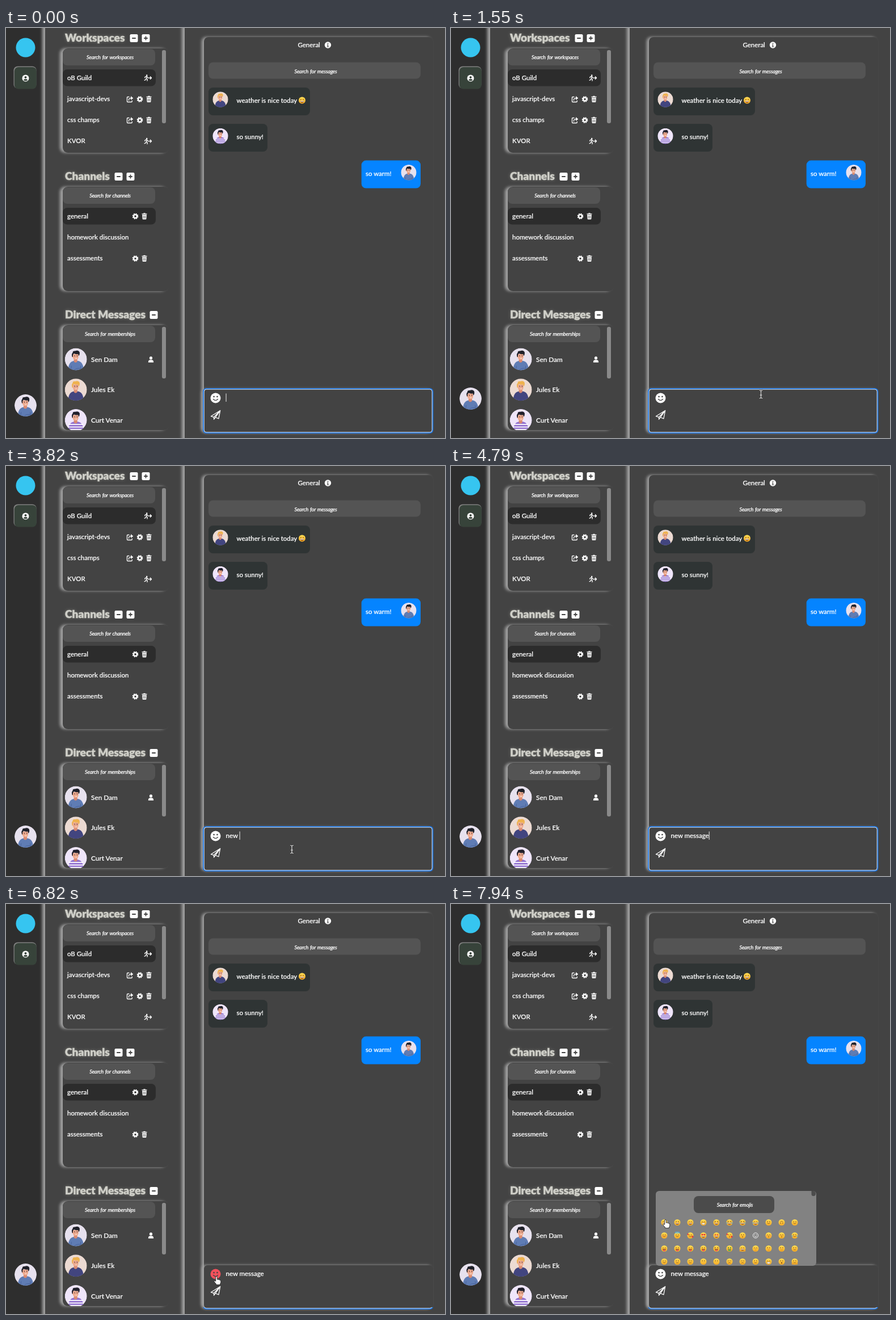
Animation of 774 by 723 pixels, one loop 8000 ms. Source, as an HTML page:

```html
<!DOCTYPE html>
<html lang="en">
<head>
<meta charset="utf-8">
<title>Team chat</title>
<style>
html, body { margin: 0; width: 100%; height: 100%; overflow: hidden; background: #434343; }
svg { display: block; }
text { font: 500 11.45px Lato, "Open Sans", sans-serif; fill: #fff; stroke: #fff; stroke-width: .22px; white-space: pre; }
.head { font-size: 19.1px; font-weight: 900; fill: #cfcfc8; stroke: #cfcfc8; stroke-width: .5px; }
.hint { font-size: 9.3px; font-style: italic; letter-spacing: -.25px; word-spacing: 1px; text-anchor: middle; }
.name { font-size: 11.8px; }
.line { fill: none; stroke: #fff; stroke-width: 1.3; stroke-linecap: round; stroke-linejoin: round; }
</style>
</head>
<body>
<svg id="stage" width="774" height="723" viewBox="0 0 774 723"></svg>
<script>
const BG = '#434343';
const stage = document.getElementById('stage');

const rect = (x, y, w, h, r, fill, more = '') =>
  `<rect x="${x}" y="${y}" width="${w}" height="${h}" rx="${r}" fill="${fill}" ${more}/>`;
const disc = (x, y, r, fill, more = '') => `<circle cx="${x}" cy="${y}" r="${r}" fill="${fill}" ${more}/>`;
const path = (d, fill, more = '') => `<path d="${d}" fill="${fill}" ${more}/>`;
const line = (d, more = '') => `<path class="line" d="${d}" ${more}/>`;
const text = (x, y, s, cls = '') => `<text x="${x}" y="${y}" class="${cls}">${s}</text>`;
const at = (x, y, body, k = 1) => `<g transform="translate(${x} ${y}) scale(${k})">${body}</g>`;

// Box with a soft light falling past its left edge
const panel = (x, y, w, h, r, dx = 5) =>
  rect(x - dx, y, w, h, r, '#a2a2a2', 'filter="url(#soft)"') + rect(x, y, w, h, r, BG);

const tile = rect(-7, -7, 14, 14, 2.2, '#fff') + rect(-3.4, -.9, 6.8, 1.8, .6, BG);
const icons = {
  minus: tile,
  plus: tile + rect(-.9, -3.4, 1.8, 6.8, .6, BG),
  gear: disc(0, 0, 2.9, 'none', 'stroke="#fff" stroke-width="2.4"') +
    disc(0, 0, 4.5, 'none', 'stroke="#fff" stroke-width="1.7" stroke-dasharray="2.1 1.434"'),
  trash: rect(-4.6, -4.8, 9.2, 1.4, .5, '#fff') + rect(-1.8, -5.7, 3.6, 1.5, .5, '#fff') +
    path('M-3.9-2.8H3.9L3.4 4.6Q3.3 5.5 2.4 5.5H-2.4Q-3.3 5.5-3.4 4.6Z', '#fff') +
    path('M-1.8-1V3.8M0-1V3.8M1.8-1V3.8', 'none', `stroke="${BG}" stroke-width=".7"`),
  share: line('M-1.5-4H-3.8Q-5-4-5-2.8V3.8Q-5 5-3.8 5H2.6Q3.8 5 3.8 3.8V2.6') +
    line('M-2 2Q-2.4-1.9 2-1.9', 'stroke-width="1.8"') + path('M1.6-5.4L5.8-1.8L1.6 1.6Z', '#fff'),
  leave: disc(-1.8, -4.4, 1.3, '#fff') +
    line('M-5.4-.2L-4.4-2.2L-1.6-2.5L.2-.1L1.8.1M-1.8-2L-2.7.9L-.7 2.6L-1 5M-3 1.4L-3.7 3.2L-5.8 4.2') +
    line('M2.6 0H6.2M4.4-2.2L6.5 0L4.4 2.2'),
  user: disc(0, -2.6, 2.6, '#fff') + path('M-4.7 5.2Q-4.7.8-1 .8H1Q4.7.8 4.7 5.2Z', '#fff'),
  account: disc(0, 0, 6, '#fff') + disc(0, -1.5, 2, '#37433a') + path('M-3.6 3.6Q-3 1.4-1 1.4H1Q3 1.4 3.6 3.6Q0 6 -3.6 3.6Z', '#37433a'),
  info: disc(0, 0, 5.7, '#fff') + disc(0, -2.6, .95, BG) + path('M-1.3-.8H.6V2.4H1.5V3.5H-1.5V2.4H-.6V.3H-1.3Z', BG),
  plane: line('M-8.2 2.2L8.2-8L5.4 6.4L-.4 4L-3 7.6V3.8ZM-3 3.8L8.2-8L-.4 4', 'stroke-width="1.5"'),
};
const icon = (id, x, y) => at(x, y, icons[id]);

// Illustrated portraits, drawn in a circle of radius 20
const looks = {
  blue: ['#e7e1ee', '#5f7cb4', '#1f2029'],
  blond: ['#ecdad2', '#42457f', '#efb24f'],
  stripe: ['#efe5fb', '#9170d0', '#22202c'],
};
function avatar(kind, x, y, r) {
  const [back, shirt, hair] = looks[kind];
  let body = path('M-14 21Q-14 5-4 3H4Q14 5 14 21Z', shirt);
  if (kind === 'stripe') body += path('M-13 8H13M-14 12.5H14M-14 17H14', 'none', 'stroke="#fff" stroke-width="1.8"');
  if (kind === 'blue') body += path('M-9 20L-8 12M9 20L8.5 12M-3 20Q2 15 9 17', 'none', 'stroke="#48639b" stroke-width="1"');
  const head = path('M-3.6 0H3.6V7Q0 11-3.6 7Z', '#d9896f') +
    path('M-6-9H6V-3Q5.5 3.4 0 3.4T-6-3Z', '#eeaa8e') + disc(-6.2, -3.6, 1.6, '#eeaa8e') +
    path('M-7-3Q-9.5-9-6-12Q-6.5-16-1-15.5Q6-18 8.5-12.5Q9-7 6.4-5L5.4-9Q0-8-3.5-10L-5.6-7.5V-3Z', hair) +
    path('M-3-6H-1M2-6H4.4', 'none', 'stroke="#3a2730" stroke-width=".8"') +
    disc(-1.8, -4.2, .7, '#3a2730') + disc(3.2, -4.2, .7, '#3a2730') +
    path('M-1.4-.4Q1 1.6 3.2-.5Z', '#fff');
  return at(x, y, '<g clip-path="url(#round)">' + disc(0, 0, 20, back) + body + at(-.5, -1.6, head, .86) + '</g>', r / 20);
}

// Small faces: eyes, mouth, extra
const DARK = '#80501a';
const INK = `stroke="${DARK}" stroke-width=".8" stroke-linecap="round"`;
const pair = f => f(-2.1) + f(2.1);
const eyes = {
  o: pair(x => `<ellipse cx="${x}" cy="-1.4" rx=".7" ry="1.05" fill="${DARK}"/>`),
  '^': pair(x => path(`M${x - 1.2}-.8Q${x}-2.8 ${x + 1.2}-.8`, 'none', INK)),
  x: path('M-3.4-2.4L-1.4-1.4L-3.4-.4M3.4-2.4L1.4-1.4L3.4-.4', 'none', INK),
  h: pair(x => path(`M${x} .4L${x - 2}-2Q${x - 1}-3.8 ${x}-2.4Q${x + 1}-3.8 ${x + 2}-2Z`, '#e8283c')),
  s: pair(x => path(`M${x}-3.6L${x + .7}-2L${x + 2}-1.7L${x + .7}-.7L${x + 1} .6L${x}-.2L${x - 1} .6L${x - .7}-.7L${x - 2}-1.7L${x - .7}-2Z`, '#e4483c')),
  w: disc(-2.1, -1.4, .8, DARK) + path('M1-1.2Q2.2-2.4 3.4-1.2', 'none', INK),
  '-': path('M-3.3-1.3H-1M1-1.3H3.3', 'none', INK),
  g: pair(x => disc(x, -1.3, 1.2, '#3c8f3a')),
};
const grin = 'M-3.3 1H3.3Q2.8 4.2 0 4.2T-3.3 1Z';
const mouths = {
  D: path(grin, '#93521f') + path('M-3.1 1.1H3.1L2.7 2.2H-2.7Z', '#fff'),
  G: path(grin, '#fff', `stroke="${DARK}" stroke-width=".4"`),
  u: path('M-2.4 1.5Q0 3.8 2.4 1.5', 'none', INK),
  f: path('M-2.2 2.8Q0 1 2.2 2.8', 'none', INK),
  k: path('M-.4 1.2Q1.6 1.6 0 2.4Q1.6 2.8-.4 3.6', 'none', INK),
  _: path('M-2 2.4H2', 'none', INK),
  T: path(grin, '#93521f') + path('M-1.5 2.4H1.7V4.4Q0 6-1.5 4.4Z', '#f0506e'),
  O: `<ellipse cy="2.5" rx="1.2" ry="1.5" fill="${DARK}"/>`,
  n: '',
};
const extras = {
  '.': '',
  b: disc(-4.8, 1, 1.1, '#4aa8ee') + disc(4.6, 1, 1.1, '#4aa8ee'),
  a: `<ellipse cy="-5.6" rx="4" ry="1.3" fill="none" stroke="#49b4f0" stroke-width="1.1"/>`,
  r: pair(x => disc(x * 1.7, 1.3, 1.1, '#f58a5e')),
  R: disc(4.2, 2.4, 1.6, '#e8283c') + disc(-4.6, -2.2, 1.3, '#e8283c'),
  g: path('M-2.4 1.6H2.4V5H-2.4Z', '#62a955'),
  y: pair(x => disc(x * 1.9, 4, 1.9, '#eda52e')),
  Y: disc(0, 3.4, 2.2, '#eda52e'),
  v: '',
};
function face(x, y, code, r = 5.5) {
  const [e, m, plus] = code;
  if (e === 'B') return at(x, y, disc(0, 0, 4.6, 'none', 'stroke="#fff" stroke-width=".9"') +
    pair(p => disc(p * .8, -1.3, .7, '#fff')) + path('M-2.4 1Q0 4 2.4 1', 'none', 'stroke="#fff" stroke-width=".9"'));
  const flip = plus === 'v' ? 'transform="scale(1 -1)"' : '';
  return at(x, y, disc(0, 0, 6, 'url(#sun)') + `<g ${flip}>${eyes[e]}${mouths[m]}</g>` + extras[plus], r / 6);
}
const faces = [
  'oD. oD. ^D. ^G. xD. xDb xDb ^Db ou. ouv wu.',
  '^ur ^ua ^uR hD. sD. wkR ok. B.. ^kr ^k. oub',
  '^T. oT. wT. oT. xT. gTg ^Dy ^nY onY o_Y o_.',
  'wu. o_. -_. on. on. -f. -f. o_. ^G. oO. o_y',
];

function section(y, title, hint, h) {
  return `<g filter="url(#halo)">${text(104, y + 24, title, 'head')}</g>` +
    panel(100, y + 36, 187, h, 9) + rect(100, y + 37, 163, 29, 8, '#545454') +
    text(183.5, y + 55, hint, 'hint');
}
const own = y => icon('share', 218.5, y) + icon('gear', 236, y) + icon('trash', 252, y);
const manage = y => icon('gear', 228, y) + icon('trash', 244, y);

const defs = `<defs>
  <filter id="soft" filterUnits="userSpaceOnUse" x="-40" y="-40" width="860" height="810"><feGaussianBlur stdDeviation="2.4"/></filter>
  <filter id="halo" x="-20%" y="-60%" width="140%" height="220%"><feDropShadow dx="0" dy="0" stdDeviation="2.5" flood-color="#deded0" flood-opacity=".3"/></filter>
  <linearGradient id="sun" x2="0" y2="1"><stop stop-color="#ffde55"/><stop offset="1" stop-color="#f5a925"/></linearGradient>
  <clipPath id="round"><circle r="20"/></clipPath>
  <clipPath id="list"><rect x="100" y="523" width="183" height="186"/></clipPath>
  <clipPath id="low"><rect x="340" y="711" width="420" height="12"/></clipPath>
</defs>`;

const sidebar = rect(0, 0, 774, 723, 0, '#2e2e2e') +
  panel(69, -30, 800, 790, 0) + panel(315, -30, 600, 790, 0) +
  disc(34.5, 34.5, 17, '#36c5f0') +
  rect(13.5, 67.5, 40, 39, 7, '#808080') + rect(14.8, 69, 39, 38.5, 7, '#37433a') + icon('account', 34.5, 88.5) +
  `<g id="me">${avatar('blue', 34.5, 653.5, 19.5)}</g>`;

const lists =
  section(0, 'Workspaces', 'Search for workspaces', 184) + icon('minus', 225.5, 18) + icon('plus', 246.5, 18) +
  rect(100, 73, 164, 29.5, 8, '#2c2c2c') + rect(275, 39, 7, 129, 3, '#8a8a8a') +
  ['oB Guild', 'javascript-devs', 'css champs', 'KVOR'].map((s, i) => text(108, 92 + 37 * i, s)).join('') +
  icon('leave', 250, 88) + own(125.5) + own(162.5) + icon('leave', 250, 199.5) +
  section(244, 'Channels', 'Search for channels', 184) + icon('minus', 198.5, 262) + icon('plus', 219.5, 262) +
  rect(100, 317, 164, 29.5, 8, '#2c2c2c') +
  ['general', 'homework discussion', 'assessments'].map((s, i) => text(108, 336 + 37 * i, s)).join('') +
  manage(332) + manage(406.5) +
  section(488, 'Direct Messages', 'Search for memberships', 185) + icon('minus', 260.5, 506) +
  rect(275, 527, 7, 91, 3, '#8a8a8a') + icon('user', 255.5, 584.5) +
  '<g clip-path="url(#list)">' +
  [['blue', 'Sen Dam'], ['blond', 'Jules Ek'], ['stripe', 'Curt Venar']].map(([look, who], i) =>
    avatar(look, 123.2, 584 + 53.7 * i, 19.5) + text(150, 588.5 + 53.7 * i, who, 'name')).join('') + '</g>';

const chat = panel(349, 16, 404, 697, 8, 4) +
  text(514.5, 34, 'General') + icon('info', 567.5, 30) +
  rect(357, 60.5, 374, 29, 8, '#545454') + text(546, 79.5, 'Search for messages', 'hint') +
  rect(357, 105, 179, 49, 8, '#2f3434') + avatar('blond', 378, 126, 13.7) +
  text(406.5, 132, 'weather is nice today') + face(522, 127.5, 'oD.', 6) +
  rect(357, 169, 104, 49, 8, '#2f3434') + avatar('stripe', 378, 190.5, 13.7) + text(406.5, 196, 'so sunny!') +
  rect(626.7, 233.6, 104.3, 49, 8, '#0584ff') + text(634, 260.5, 'so warm!') + avatar('blue', 710, 254.7, 13.7);

const composer = panel(349, 637, 404, 76, 6, 4) +
  '<g id="ring">' + rect(348, 635.9, 404.4, 78.2, 5, 'none', 'stroke="#1a73e0" stroke-width="2"') +
  rect(349.2, 637.1, 402, 75.8, 4, 'none', 'stroke="#dbe9fb" stroke-width="1"') + '</g>' +
  at(369.5, 652.5, `<circle id="smile" r="9"/>` + pair(x => disc(x * 1.4, -2.4, 1.3, BG)) +
    path('M-4 2Q0 6.4 4 2', 'none', `stroke="${BG}" stroke-width="1.3" stroke-linecap="round"`)) +
  icon('plane', 369.5, 682.5) + text(387.5, 656, '', 'typed') + rect(0, 644.5, 1.1, 14.5, 0, '#dedede', 'id="caret"');

const picker = '<g id="picker">' + rect(361, 506, 283, 132, 6, '#828282') +
  path('M635.5 506H639Q643 507 643 511.5Q642.5 515 639 515Q635.5 515 635.5 511.5Z', '#4c4c4c') +
  rect(428, 515, 142, 30, 8, '#4b4b4b') + text(500.5, 534, 'Search for emojis', 'hint') +
  faces.map((row, j) => row.split(' ').map((c, i) => face(376 + 23 * i, 561.5 + 23 * j, c)).join('')).join('') + '</g>';

const beam = 'M-2.8-7Q-.4-7 0-5.4Q.4-7 2.8-7M0-5.4V5.4M-2.8 7Q-.4 7 0 5.4Q.4 7 2.8 7M-1.8 1.4H1.8';
const edge = 'stroke="#222" stroke-width=".9" stroke-linejoin="round"';
const pointers = {
  beam: path(beam, 'none', 'stroke="#2a2a2a" stroke-width="3"') + path(beam, 'none', 'stroke="#c4c4c4" stroke-width="1.6"'),
  arrow: path('M0 0V12L2.8 9.5L4.7 14L6.7 13.1L4.8 8.8H8.6Z', '#fff', edge),
  hand: path('M-1.3 1Q-1.3-.4 0-.4T1.3 1V5.2Q2.6 4.4 3.6 5.4Q5 4.8 5.8 6.1Q7.8 5.8 7.8 8V10Q7.6 12 6.4 13V14.4H-.6V13Q-3 10.5-4.3 8.3Q-3.6 6.4-1.3 8.2Z', '#fff', edge),
};

stage.innerHTML = defs + sidebar + lists + chat + composer + picker +
  '<g id="pointer">' + Object.keys(pointers).map(k => `<g id="${k}">${pointers[k]}</g>`).join('') + '</g>';

const $ = id => document.getElementById(id);
const typed = stage.querySelector('.typed');
const show = (el, on) => el.setAttribute('visibility', on ? 'inherit' : 'hidden');

const LOOP = 8000, BLUR = 6820, OPEN = 6890;
const message = 'new message ';
const keys = [3580, 3660, 3740, 3820, 4070, 4150, 4310, 4470, 4550, 4630, 4790, 5700];
const blinks = [420, 920, 1420, 1920, 2840, 3340, 5290, 5700, 6200, 6660];
const sweep = [[900, 372, 697], [1060, 410, 686], [1220, 478, 660], [1380, 535, 638], [1460, 546, 638],
  [1540, 546.5, 646], [1700, 538, 662], [1780, 527, 673], [1860, 508, 660], [1940, 485, 631],
  [2060, 466, 643], [2180, 460.5, 653], [2420, 460.5, 653], [2500, 470, 659], [2580, 492, 670], [2660, 504, 676], [4540, 504, 676]];
const reach = [[5860, 475.5, 668], [6020, 432, 662], [6180, 402, 658], [6340, 382, 657], [6500, 374, 658],
  [6660, 371, 657], [7140, 371, 657], [7300, 372, 648], [7460, 374, 616], [7620, 376, 578], [7780, 378, 557], [LOOP, 378, 557]];

const passed = (list, t) => list.filter(k => k <= t).length;

function along(track, t) {
  const i = track.findIndex(k => k[0] > t);
  if (i < 1) return null;
  const [t0, x0, y0] = track[i - 1], [t1, x1, y1] = track[i];
  const p = (t - t0) / (t1 - t0);
  return [x0 + (x1 - x0) * p, y0 + (y1 - y0) * p];
}

function draw(t) {
  $('me').setAttribute('transform', `translate(0 ${t < 90 ? 12 : 0})`);

  typed.textContent = message.slice(0, passed(keys, t));
  const width = typed.textContent ? typed.getComputedTextLength() : 0;
  $('caret').setAttribute('x', 387.5 + width);
  show($('caret'), t < BLUR && passed(blinks, t) % 2 === 0);
  $('ring').setAttribute('clip-path', t < BLUR ? 'none' : 'url(#low)');
  show($('picker'), t >= OPEN);

  // The pointer is sampled every 80 ms
  const tick = Math.floor((t - 20) / 80) * 80 + 20;
  const spot = along(sweep, tick) || along(reach, tick);
  show($('pointer'), spot);
  let kind = 'beam', hover = false;
  if (spot) {
    const [x, y] = spot;
    hover = x < 379 && y > 643 && y < 662 && t > 6000;
    if (hover || t >= 7940) kind = 'hand';
    else if (t > OPEN) kind = 'arrow';
    $('pointer').setAttribute('transform', `translate(${x} ${y})`);
  }
  for (const k in pointers) show($(k), k === kind);
  $('smile').setAttribute('fill', hover ? '#f4515c' : '#fff');
}

const start = performance.now();
function loop() {
  draw((performance.now() - start) % LOOP);
  requestAnimationFrame(loop);
}
loop();
</script>
</body>
</html>
```
